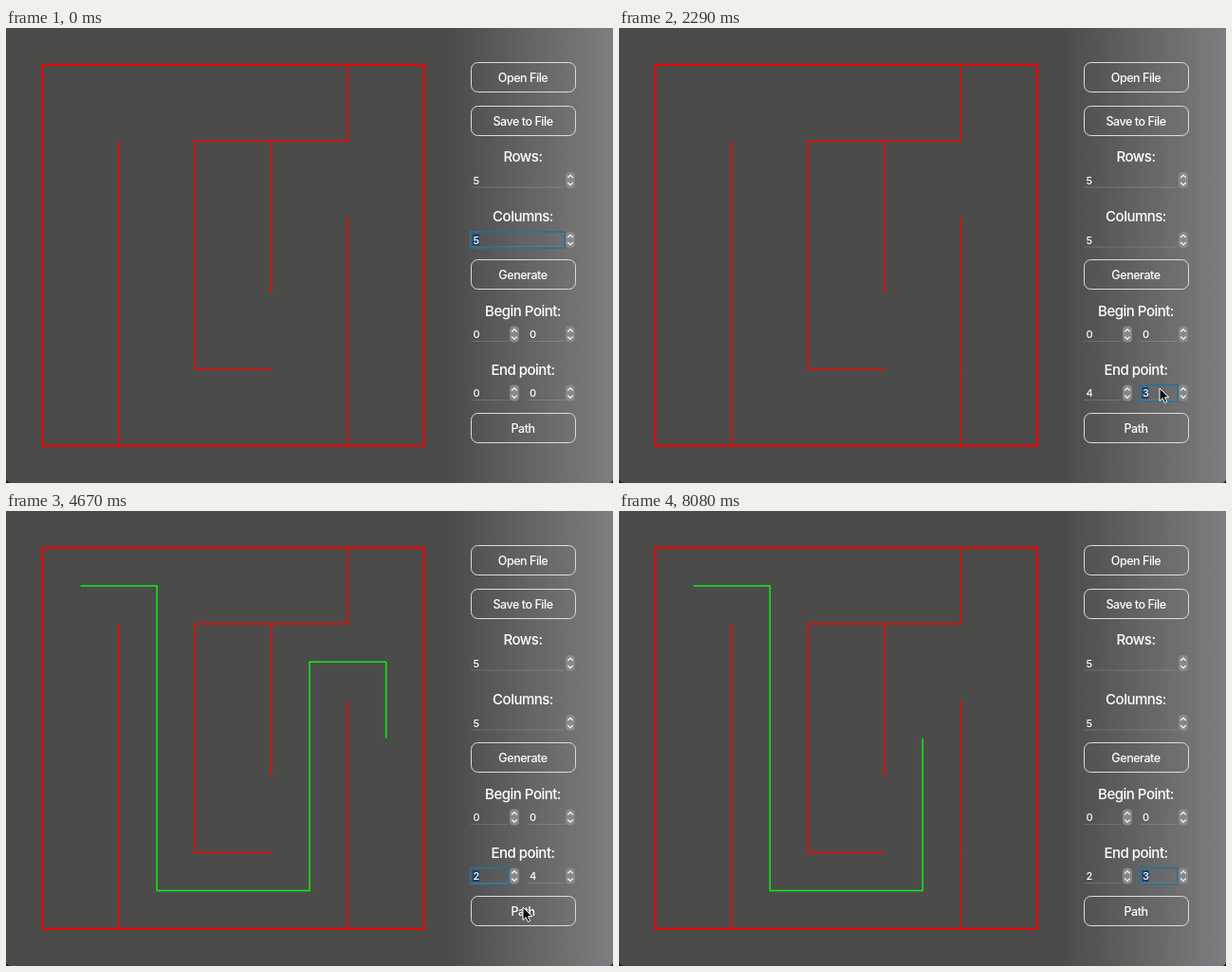
Animation, 640 px wide and 480 px high, one loop 8.18 s. Source, as an HTML page:

```html
<!DOCTYPE html>
<html lang="en">
<head>
<meta charset="utf-8">
<title>Maze</title>
<style>
  html, body { margin: 0; width: 100%; height: 100%; overflow: hidden; background: #111; }
  svg { display: block; width: 640px; height: 480px; }
  text { font: 500 11px Inter, sans-serif; fill: #fff; }
  .button, .title { text-anchor: middle; }
  .button { font-size: 12.5px; letter-spacing: -.45px; }
  .title { font-size: 15px; letter-spacing: -.5px; }
  .grid path { fill: none; vector-effect: non-scaling-stroke; }
</style>
</head>
<body>
<svg viewBox="0 0 640 480">
  <defs>
    <linearGradient id="shade">
      <stop offset="0" stop-color="#4b4b4b"/>
      <stop offset="1" stop-color="#7e7e80"/>
    </linearGradient>
  </defs>
  <rect y="-9" width="640" height="489" rx="5" fill="#4b4b4a"/>
  <path d="M468 0H640V475Q640 480 635 480H468Z" fill="url(#shade)"/>
  <!-- One unit is one maze cell -->
  <g class="grid" transform="translate(38.4 38.7) scale(80.5 80.4)">
    <path d="M1 1V5M4 0V1H2V4H3M3 1V3M4 2V5" stroke="#f00800" stroke-width="1.5"/>
    <path d="M0 0H5V5H0Z" stroke="#f80000" stroke-width="2"/>
    <path id="route" stroke="#10ec10" stroke-width="1.5"/>
  </g>
  <g id="panel"></g>
  <path id="cursor" d="M0 0V13.5L3.2 10.6L5.3 15.4L7.6 14.4L5.5 9.7H9.8Z" fill="#080808" stroke="#fff"/>
</svg>
<script>
const LOOP = 8180, PRESS = 130, FIRST_MOVE = 250;
const $ = id => document.getElementById(id);
const show = (el, on) => el.style.display = on ? '' : 'none';

function add(tag, attrs, text = '') {
  const el = document.createElementNS('http://www.w3.org/2000/svg', tag);
  for (const key in attrs) el.setAttribute(key, attrs[key]);
  el.textContent = text;
  return $('panel').appendChild(el);
}

function button(label, y) {
  const box = add('rect', { x: 490.5, y: y - 15.5, width: 110, height: 31, rx: 7, fill: 'transparent', stroke: '#dcdcdc' });
  add('text', { class: 'button', x: 545, y: y + 4.5 }, label);
  return box;
}

function title(label, y) {
  add('text', { class: 'title', x: 545, y }, label);
}

function spinBox(x, y, width, value) {
  add('path', { d: `M${x} ${y + 7.5}h${width}`, stroke: '#fff', 'stroke-opacity': .15 });
  const focus = add('g', {});
  focus.append(
    add('rect', { x: x - .5, y: y - 8.5, width: width + 1, height: 17, fill: 'none', stroke: '#2b6f9c', 'stroke-width': 1.6 }),
    add('rect', { x: x + 2, y: y - 6, width: 7, height: 12, fill: '#1b4268' })
  );
  const text = add('text', { x: x + 2.5, y: y + 4 }, value);
  const sx = x + width + 1.5;
  add('rect', { x: sx, y: y - 8.5, width: 10, height: 17, rx: 4, fill: '#888' });
  add('path', {
    d: `M${sx + 2.2} ${y - 2.5}l2.8 -2.8l2.8 2.8m-5.6 5l2.8 2.8l2.8 -2.8`,
    fill: 'none', stroke: '#f0f0f0', 'stroke-width': 1.3
  });
  return { focus, text };
}

button('Open File', 52);
button('Save to File', 98);
title('Rows:', 141);
spinBox(490, 160.5, 98.5, 5).focus.remove();
title('Columns:', 204);
const columns = spinBox(490, 223.5, 98.5, 5);
button('Generate', 260);
title('Begin Point:', 304);
spinBox(490, 323, 39.5, 0).focus.remove();
spinBox(549.5, 323, 39, 0).focus.remove();
title('End point:', 366);
const endRow = spinBox(490, 385, 39.5, 0);
const endCol = spinBox(549.5, 385, 39, 0);
const pathButton = button('Path', 422);

// The pointer rests at each stop, changing a field or pressing Path
const stops = [
  { from: 0, to: FIRST_MOVE, x: 593, y: 226 },
  { from: 800, to: 1500, x: 520, y: 380, field: endRow, goal: 4 },
  { from: 1760, to: 2600, x: 570, y: 380, field: endCol, goal: 4 },
  { from: 2850, to: 3200, x: 565, y: 414 },
  { from: 3600, to: 4150, x: 520, y: 385, field: endRow, goal: 2 },
  { from: 4420, to: 5000, x: 545, y: 418 },
  { from: 5300, to: 5600, x: 578, y: 393, field: endCol, goal: 3 },
  { from: 5950, to: 6850, x: 545, y: 420 },
  { from: 7500, to: LOOP, x: 415, y: 480 }
];

const mix = (a, b, k) => a + (b - a) * k;
const smooth = k => k * k * (3 - 2 * k);

function routeTo(row, col) {
  return 'M.5 .5h1v4h2' + (col > 3 ? 'V1.5h1' : '') + `V${row + .5}`;
}

function movePointer(t) {
  const i = stops.findLastIndex(stop => stop.from <= t);
  const here = stops[i], next = stops[i + 1] || here;
  const k = t > here.to ? smooth((t - here.to) / (next.from - here.to)) : 0;
  $('cursor').setAttribute('transform', `translate(${mix(here.x, next.x, k)} ${mix(here.y, next.y, k)})`);
  show($('cursor'), t > FIRST_MOVE && next !== here);
}

function draw(t) {
  const values = new Map([[endRow, 0], [endCol, 0]]);
  let active = columns, route = '', pressed = false;

  for (const { from, to, field, goal } of stops.slice(1, -1)) {
    if (t < from) break;
    if (field) {
      active = field;
      values.set(field, Math.round(mix(values.get(field), goal, Math.min(1, (t - from) / (to - from)))));
    } else {
      pressed = t < from + PRESS;
      if (!pressed) route = routeTo(values.get(endRow), values.get(endCol));
    }
  }

  for (const [field, value] of values) field.text.textContent = value;
  for (const field of [columns, endRow, endCol]) show(field.focus, field === active);
  pathButton.setAttribute('fill', pressed ? '#3b3a42' : 'transparent');
  $('route').setAttribute('d', route);
  movePointer(t);
}

const start = performance.now();
function tick() {
  draw((performance.now() - start) % LOOP);
  requestAnimationFrame(tick);
}
tick();
</script>
</body>
</html>
```
